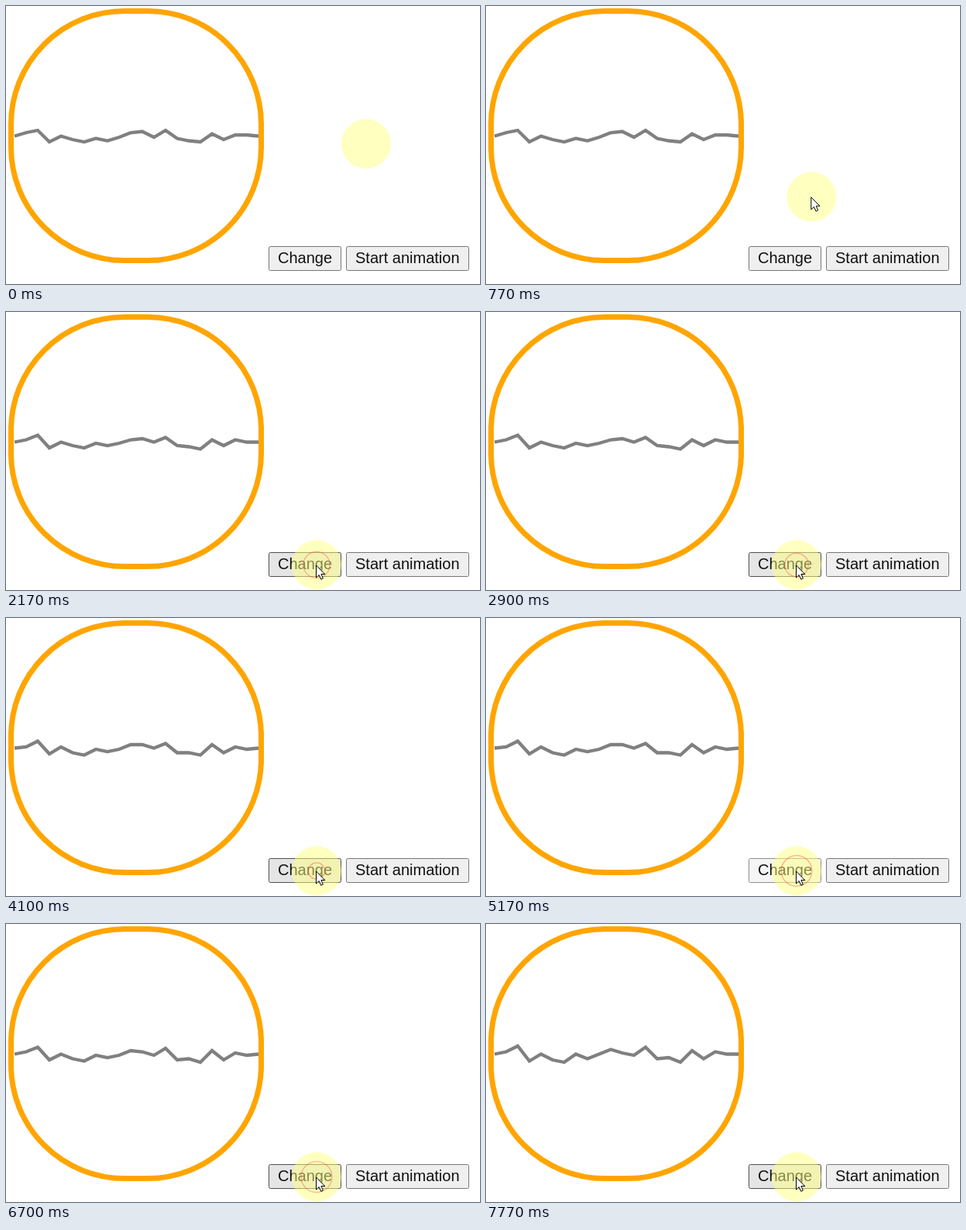
Recreate the animation shown at these times as an HTML page. Size 612x360 px, loop 8000 ms.

```html
<!DOCTYPE html>
<html lang="en">
<head>
<meta charset="utf-8">
<title>Line change demo</title>
<style>
  html, body { margin: 0; width: 100%; height: 100%; overflow: hidden; background: #fff; }
  svg { display: block; }
  text { font: 20px Arial, "Liberation Sans", sans-serif; fill: #111; }
  #line { fill: none; stroke: #808080; stroke-width: 4.3; filter: blur(.6px); }
  .button { fill: #efefef; stroke: #767676; }
  .hover { fill: #e5e5e5; stroke: #4f4f4f; }
  .active { fill: #f5f5f5; stroke: #8d8d8d; }
</style>
</head>
<body>
<svg width="612" height="360" viewBox="0 0 612 360">
  <polyline id="line"/>
  <rect x="6.5" y="6.5" width="323" height="323" rx="146.5" fill="none" stroke="#ffa500" stroke-width="7"/>
  <rect id="change" class="button" x="339.5" y="311.5" width="93" height="31" rx="2"/>
  <text x="351" y="333">Change</text>
  <rect class="button" x="439.5" y="311.5" width="158" height="31" rx="2"/>
  <text x="451" y="333">Start animation</text>
  <g id="pointer">
    <circle r="32" fill="#ffff80" fill-opacity=".5"/>
    <circle id="ring" fill="none" stroke="#ff4628" stroke-opacity=".42" stroke-width="1.2"/>
    <path id="arrow" d="M-.5 .5V16.5L3.2 13L5.7 18.7L8.4 17.5L5.9 12H10.8Z" fill="#fff" stroke="#000"/>
  </g>
</svg>
<script>
const LOOP = 8000;
const TICK = 1000 / 15;
const RING_TIME = 1040;
const CHANGE_DELAY = 40;
const clicks = [2090, 3520, 5150, 6690];
const heights = [0, -3, -5, 5, 0, 3, 5, 2, 4, 1, -3, -4, 1, -5, 2, 4, 5, -2, 3, -1, -1, 0];

const $ = id => document.getElementById(id);
const set = (id, name, value) => $(id).setAttribute(name, value);
const show = (id, on) => set(id, "visibility", on ? "visible" : "hidden");

// Seeded step of -1, 0 or 1; the two ends stay fixed
function nudge(point, change) {
  if (point % (heights.length - 1) === 0) return 0;
  const n = Math.sin(point * 12.9898 + change * 78.233) * 43758.5453;
  return Math.floor((n - Math.floor(n)) * 3) - 1;
}

function linePoints(t) {
  const done = clicks.filter(start => t >= start + CHANGE_DELAY);
  return heights.map((h, i) => {
    const level = done.reduce((sum, _, k) => sum + nudge(i, k), h);
    return `${11 + 15 * i},${168.5 + 1.5 * level}`;
  }).join(" ");
}

// The ring snaps shut, then opens steadily
function ringRadius(age) {
  if (!(age < RING_TIME)) return 0;
  const s = age / 1000;
  return Math.max(0, s < 0.2 ? 20 - 500 * s * s : 20 * (s - 0.05));
}

function draw(t) {
  const p = Math.min(1, Math.max(0, (t - 440) / 690));
  const x = 465 - 64 * (1 - (1 - p) ** 1.87);
  const y = 178.5 + 149 * p * p * (3 - 2 * p);
  const age = t - clicks.filter(start => start <= t).pop();
  const radius = ringRadius(age);
  const pressed = age > 15 && age < CHANGE_DELAY;

  set("line", "points", linePoints(t));
  set("pointer", "transform", `translate(${x} ${y})`);
  show("arrow", p > 0);
  set("ring", "r", radius);
  show("ring", radius > 0);
  set("change", "class", "button" + (pressed ? " active" : y > 311 ? " hover" : ""));
}

const begin = performance.now();
function frame() {
  const t = (performance.now() - begin) % LOOP;
  draw((Math.floor(t / TICK - 0.5) + 0.5) * TICK);
  requestAnimationFrame(frame);
}
frame();
</script>
</body>
</html>
```
